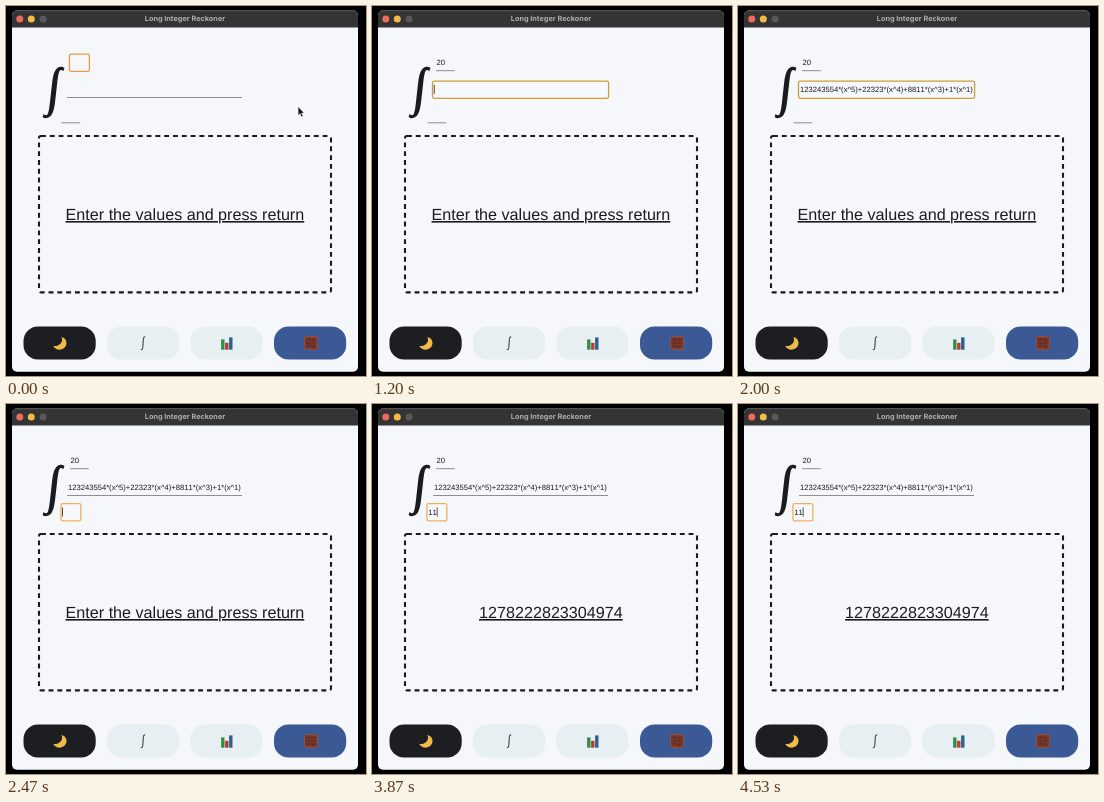
Animation of 360 by 370 pixels, one loop 4590 ms. Source, as an HTML page:

```html
<!DOCTYPE html>
<html lang="en">
<head>
<meta charset="utf-8">
<title>Long Integer Reckoner</title>
<style>
  html, body { margin: 0; width: 100%; height: 100%; overflow: hidden; background: #000; }
  svg { display: block; width: 360px; height: 370px; }
  text { font-family: "Liberation Sans", Arial, sans-serif; fill: #1a1b1f; text-rendering: geometricPrecision; }
  .title { font: bold 7.3px Inter, sans-serif; fill: #aeaeae; text-anchor: middle; }
  .field text { font-size: 7.65px; font-kerning: none; }
  .field line { stroke: #8d8f93; stroke-width: 1; }
  .ring { fill: #f7f8fb; stroke-width: 1.3; }
  .caret { fill: #222; }
  .result { font-size: 16.15px; text-anchor: middle; text-decoration: underline; text-decoration-skip-ink: none; }
</style>
</head>
<body>
<svg viewBox="0 0 360 370">
  <rect x="6" y="4.5" width="346" height="361.2" rx="5" fill="#f5f7fb"/>
  <path d="M6 21.5V9.5a5 5 0 0 1 5-5H347a5 5 0 0 1 5 5V21.5Z" fill="#343435"/>
  <path d="M10 4.9H348" stroke="#4c4c4d" stroke-width=".7"/>
  <circle cx="13.8" cy="12.9" r="3.5" fill="#ee6a5c"/>
  <circle cx="25.3" cy="12.9" r="3.5" fill="#f2bb48"/>
  <circle cx="37.1" cy="12.9" r="3.5" fill="#58585a"/>
  <text class="title" x="179" y="15.3">Long Integer Reckoner</text>

  <path fill="#1a1b1f" d="M58.4 61.9Q56.6 60.4 54.3 60.8C49.3 61.5 47.2 67.5 46.1 77L44 96C43 104.5 42.2 109.3 40.2 109.3Q39 109.3 37.6 107.9L36.6 110.9Q38.3 112.4 40.6 112.1C46 111.5 47.9 105 49 96.5L51.1 78C52.1 69.5 52.8 64.1 55 64.1Q56.2 64.1 57.3 65.3Z"/>
  <g id="fields"></g>

  <rect x="33" y="130" width="292" height="156.4" rx="2" fill="none" stroke="#1a1b1f" stroke-width="2.1" stroke-dasharray="4.9 3.9"/>
  <text class="result" id="result" x="178.9" y="214"></text>

  <g id="buttons"></g>
  <path d="M55.4 331C57.8 335.6 53.4 341 47.2 340C49.2 343.6 54 344.7 57.4 342.6C62.4 339.4 61.2 332.2 55.4 331Z" fill="#f0ba48"/>
  <path d="M139.2 331q-1.6-.9-1.8 1.6L136.8 341.4q-.2 3-2 2.3" fill="none" stroke="#1a1b1f" stroke-width=".9"/>
  <g>
    <rect x="214.3" y="330.7" width="13" height="13" rx="1" fill="#e9eef0"/>
    <path d="M215.1 333.4h3.4v10.3h-3.4z" fill="#2f8f48"/>
    <path d="M219.1 336.8h3.4v6.9h-3.4z" fill="#bd3b33"/>
    <path d="M223.1 331.4h3.4v12.3h-3.4z" fill="#2b638f"/>
  </g>
  <g>
    <rect x="298.7" y="330.8" width="12.5" height="12.5" rx=".8" fill="#78372a" stroke="#a1543c" stroke-width=".9"/>
    <path d="M299 333.9h12m-12 3.1h12m-12 3.1h12M302.8 331v2.9m4.5 0v3.1m-4.5 0v3.1m4.5 0v3.1" fill="none" stroke="#55291f" stroke-width=".6"/>
  </g>

  <path id="mouse" d="M292.2 100.8V109.2L294.1 107.5L295.4 110.7L296.9 110.1L295.5 107H298Z" fill="#111" stroke="#e4e6ea" stroke-width=".4"/>
</svg>
<script>
const LOOP = 4590;
const SIZE = 7.65;
const PROMPT = "Enter the values and press return";
const FORMULA = "123243554*(x^5)+22323*(x^4)+8811*(x^3)+1*(x^1)";

// Each step: start time and the values it changes.
const STEPS = [
  [0, { focus: "upper", upper: "", body: "", lower: "", result: PROMPT, mouse: true }],
  [330, { upper: "2", mouse: false }],
  [530, { upper: "20" }],
  [1000, { focus: "body" }],
  [1470, { body: FORMULA }],
  [2130, { focus: "lower" }],
  [2930, { lower: "1" }],
  [3400, { lower: "11" }],
  [3800, { result: "1278222823304974" }]
];

const FIELDS = {
  upper: { x: 63.4, y: 48.1, w: 20, h: 17.2, line: 64.7, base: 59.1, text: 64.6, color: "#e39a43" },
  body:  { x: 60.5, y: 75.1, w: 176.1, h: 17.2, line: 91.5, base: 86.1, text: 61.9, color: "#cf9d38" },
  lower: { x: 54.9, y: 99.7, w: 20, h: 17.2, line: 116.8, base: 110.8, text: 56.3, color: "#efb05a" }
};

const BUTTONS = [[17.5, "#1d1e22"], [101, "#e7eff2"], [184.3, "#e7eff2"], [268, "#3b5994"]];

const $ = id => document.getElementById(id);

function add(parent, tag, attrs) {
  const el = document.createElementNS("http://www.w3.org/2000/svg", tag);
  for (const key in attrs) el.setAttribute(key, attrs[key]);
  return parent.appendChild(el);
}

const show = (el, on) => el.setAttribute("visibility", on ? "visible" : "hidden");

for (const [x, fill] of BUTTONS)
  add($("buttons"), "rect", { x, y: 320.5, width: 72.2, height: 33, rx: 14.5, fill });

for (const f of Object.values(FIELDS)) {
  const g = add($("fields"), "g", { class: "field" });
  f.rule = add(g, "line", { x1: f.x + .6, x2: f.x + f.w - .6, y1: f.line, y2: f.line });
  f.ring = add(g, "rect", { class: "ring", x: f.x, y: f.y, width: f.w, height: f.h, rx: 1.8, stroke: f.color });
  f.label = add(g, "text", { x: f.text, y: f.base });
  f.caret = add(g, "rect", { class: "caret", y: f.base - 7.3, width: .8, height: 9 });
}

function render(time) {
  const state = {};
  for (const [start, change] of STEPS)
    if (time >= start) Object.assign(state, change);

  for (const [name, f] of Object.entries(FIELDS)) {
    const value = state[name];
    const active = state.focus === name;
    f.label.textContent = value;
    show(f.ring, active);
    show(f.rule, !active);
    f.caret.setAttribute("x", f.text + value.length * SIZE * .556 - .1);
    show(f.caret, active && value !== FORMULA && !(name === "upper" && !value));
  }
  $("result").textContent = state.result;
  show($("mouse"), state.mouse);
}

const origin = performance.now();
function tick(now) {
  render(Math.max(0, now - origin) % LOOP);
  requestAnimationFrame(tick);
}
render(0);
requestAnimationFrame(tick);
</script>
</body>
</html>
```
